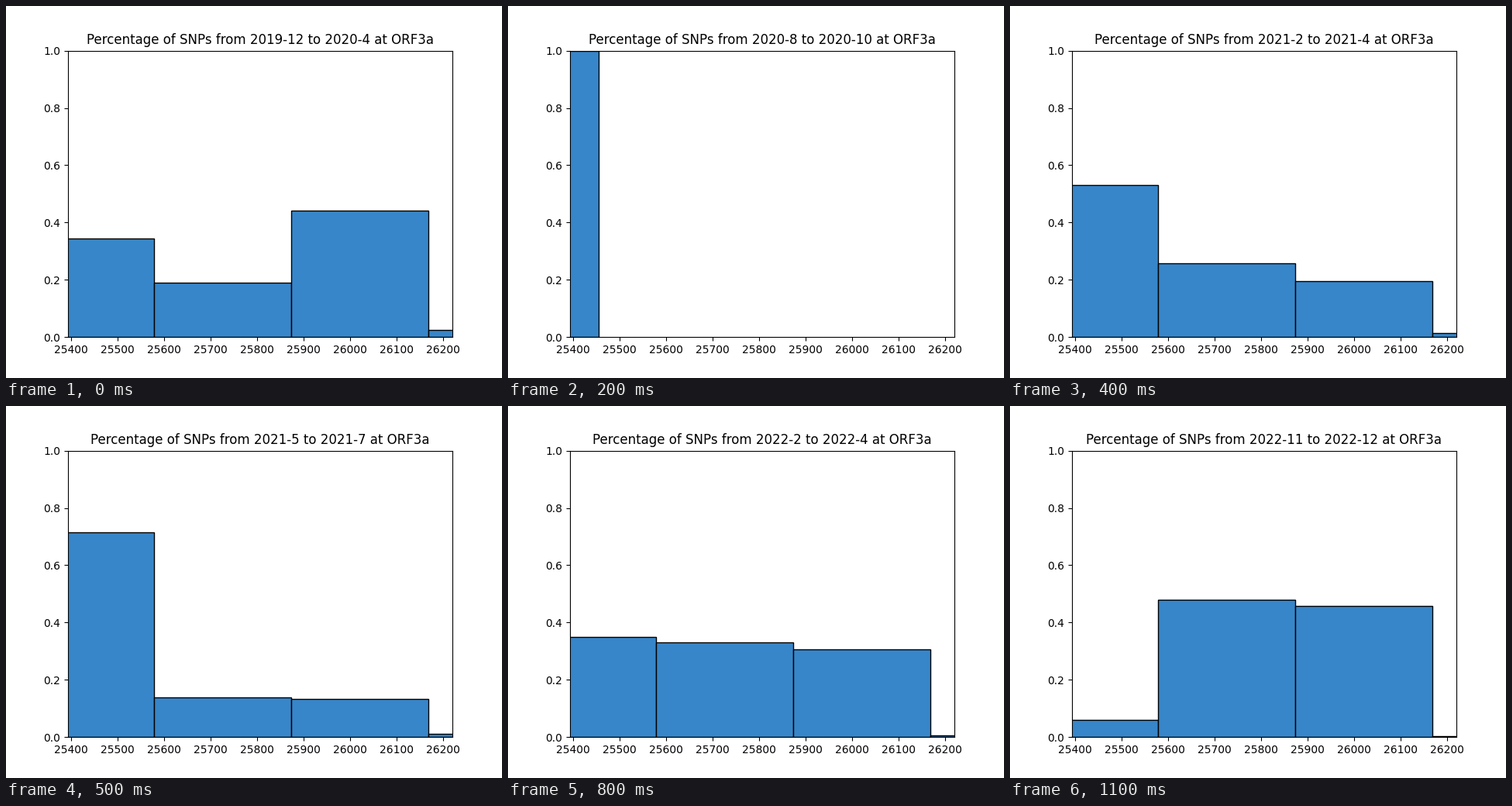
These frames come from a looping animation (640x480 px, 1.2 s). A matplotlib script:

```python
import matplotlib.pyplot as plt
from matplotlib.animation import FuncAnimation

BIN = 294.5
GENE = (25393, 26220)
MAIN, EARLY, SHIFTED = 25284.2, 25160.5, 25371.2

# Left edge of the first bin, then the share of SNPs in each bin
PERIODS = [
    (MAIN, (0.343, 0.1888, 0.4404, 0.0238)),
    (MAIN, (0.346, 0.282, 0.350, 0.020)),
    (EARLY, (1.0,)),
    (MAIN, (0.3484, 0.3757, 0.2592, 0.0157)),
    (MAIN, (0.531, 0.257, 0.196, 0.013)),
    (MAIN, (0.7137, 0.1373, 0.1319, 0.0103)),
    (MAIN, (0.730, 0.139, 0.118, 0.010)),
    (SHIFTED, (0.7815, 0.140, 0.0726)),
    (MAIN, (0.350, 0.330, 0.305, 0.006)),
    (MAIN, (0.0238, 0.4999, 0.4675, 0.003)),
    (MAIN, (0.041, 0.489, 0.462, 0.003)),
    (MAIN, (0.0589, 0.4783, 0.4566, 0.003)),
]

fig, ax = plt.subplots(figsize=(6.4, 4.8), dpi=100)
ax.set_xlim(GENE)
ax.set_ylim(0, 1)
title = ax.set_title("")
bars = []


def month(n):
    """Label of the n-th month after January 2020."""
    return f"{2020 + n // 12}-{n % 12 + 1}"


def draw(i):
    while bars:
        bars.pop().remove()
    left, shares = PERIODS[i]
    edges = [left + BIN * k for k in range(len(shares))]
    bars.extend(ax.bar(edges, shares, width=BIN, align="edge",
                       color="#3786c9", edgecolor="black", linewidth=1))
    ax.set_xlim(GENE)
    ax.set_ylim(0, 1)

    # Quarters, with a longer first period and a shorter last one
    start = 3 * i + 1 if i else -1
    end = min(3 * i + 3, 35)
    title.set_text(f"Percentage of SNPs from {month(start)} to {month(end)} at ORF3a")
    return [*bars, title]


anim = FuncAnimation(fig, draw, frames=len(PERIODS), init_func=lambda: draw(0),
                     interval=100, repeat=True, repeat_delay=0, blit=False)
plt.show()
```
